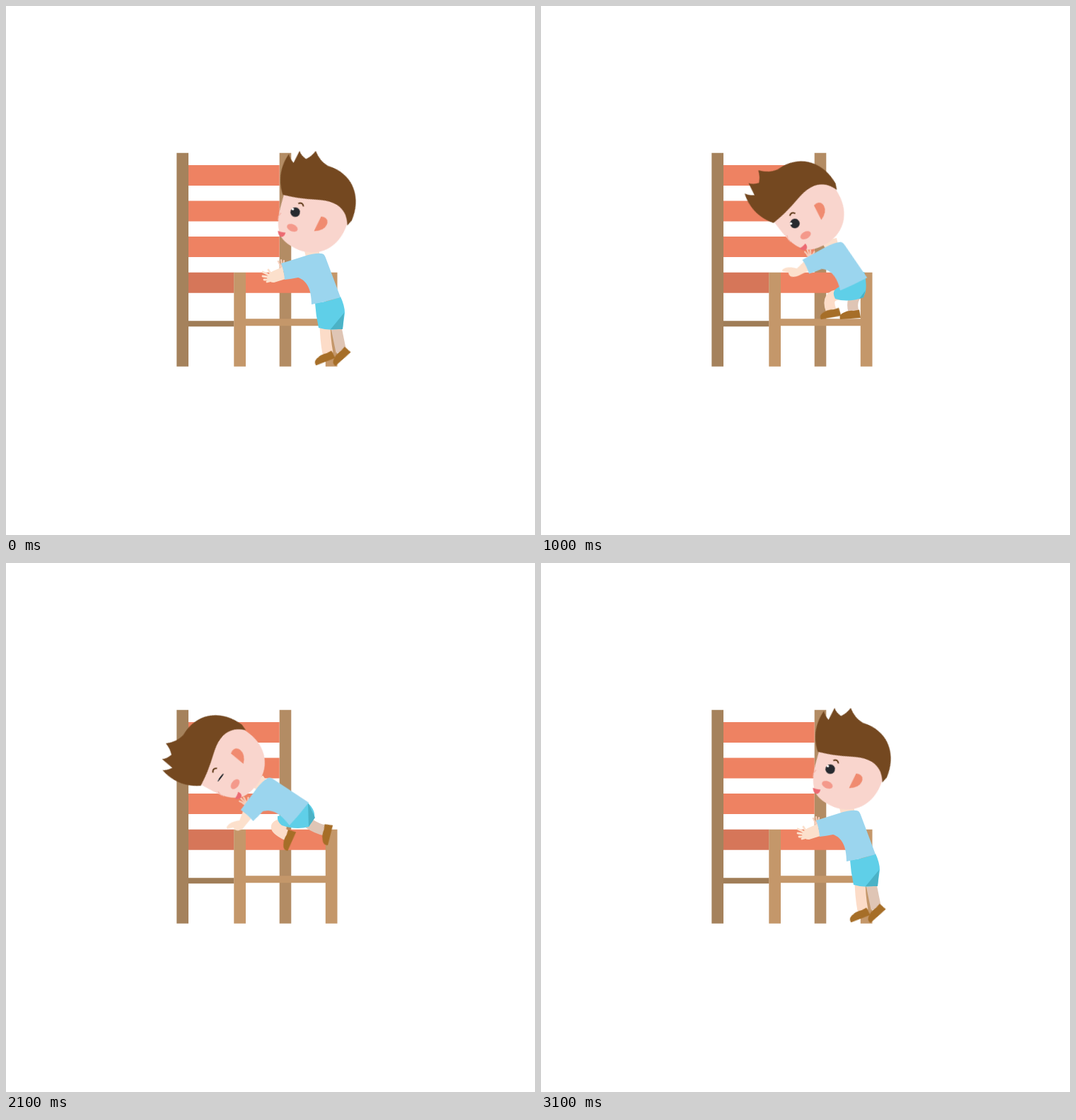
An HTML page without scripts that plays this animation: 748x748 px, repeating every 3600 ms.

```html
<!DOCTYPE html>
<html lang="en">
<head>
<meta charset="utf-8">
<title>Boy climbing a chair</title>
<style>
html, body { margin: 0; width: 100%; height: 100%; overflow: hidden; background: #fff; }
svg { display: block; width: 100vw; height: 100vh; }

/* The climb plays forward and back; one pose per 100 ms.
   The small negative delay keeps pose changes clear of exact boundaries. */
.move { animation: 1800ms step-end -5ms infinite alternate both; }
.head { animation-name: head; }
.eye { animation-name: blink; }
.torso { animation-name: torso; }
.far-hand { animation-name: far-hand; }
.open-hand { animation-name: open-hand; }
.flat-hand { animation-name: flat-hand; }
.shorts { animation-name: shorts; }
.shade { animation-name: shade; }
.near-leg { animation-name: near-leg; }
.far-leg { animation-name: far-leg; }
.near-shoe { animation-name: near-shoe; }
.far-shoe { animation-name: far-shoe; }
.leg { fill: none; stroke-width: 15; stroke-linejoin: round; }

@keyframes head {
  0% { transform: translate(409px, 291.5px) rotate(23.5deg); }
  27.78% { transform: translate(396px, 302px) rotate(0deg); animation-timing-function: steps(3); }
  44.44% { transform: translate(374px, 291px) rotate(-17deg); animation-timing-function: steps(2); }
  55.56% { transform: translate(359px, 307.5px) rotate(-29.5deg); animation-timing-function: steps(3); }
  72.22% { transform: translate(321.5px, 305.5px) rotate(-42deg); }
  77.78% { transform: translate(303.5px, 303.5px) rotate(-53deg); }
  83.33%, to { transform: translate(298px, 302.5px) rotate(-56deg); }
}
@keyframes blink {
  0%, 33.33% { transform: none; }
  27.78% { transform: scaleY(.62); }
  77.78% { transform: scaleY(.17); }
  83.33%, to { transform: none; }
}
@keyframes torso {
  0% { transform: translate(435px, 352px) rotate(0deg); }
  27.78% { transform: translate(435px, 352px) rotate(-4deg); animation-timing-function: steps(3); }
  44.44% { transform: translate(421px, 332px) rotate(-8deg); animation-timing-function: steps(2); }
  55.56% { transform: translate(412px, 338px) rotate(-12.5deg) scale(1, .93); animation-timing-function: steps(3); }
  72.22% { transform: translate(382px, 322px) rotate(-24deg) scale(1, .96); }
  77.78% { transform: translate(362px, 312.5px) rotate(-36deg); }
  83.33%, to { transform: translate(358px, 310.5px) rotate(-38deg); }
}
@keyframes far-hand {
  0% { transform: translate(-46px, 15px); }
  27.78% { transform: translate(-46px, 15px); animation-timing-function: steps(5); }
  55.56%, to { transform: translate(-36px, 7px); }
}
@keyframes open-hand { 0% { opacity: 1; } 44.44%, to { opacity: 0; } }
@keyframes flat-hand { 0% { opacity: 0; } 44.44%, to { opacity: 1; } }
@keyframes shorts {
  0% { d: path("M437,420 Q457,418 473,411 Q479,424 479,434 L476,456 Q458,460 442,455 Q438,437 437,420Z"); }
  27.78% { d: path("M440,421 Q462,417 479,407 Q486,420 485,430 L485,452 Q456,451 438,434 Q443,428 440,421Z"); animation-timing-function: steps(3); }
  44.44% { d: path("M426,402 Q448,397 467,386 Q471,397 469,408 L466,418 Q446,426 424,421 Q422,410 426,402Z"); animation-timing-function: steps(2); }
  55.56% { d: path("M420,398 Q440,385 457,376 Q461,390 459,404 L456,412 Q434,420 416,414 Q410,403 420,398Z"); animation-timing-function: steps(3); }
  72.22% { d: path("M391,371 Q410,372 435,355 Q448,362 440,381 L432,390 Q415,397 398,388 Q390,380 391,371Z"); }
  77.78%, to { d: path("M384,358 Q400,355 424,337 Q438,348 436,360 L428,373 Q410,378 390,371 Q383,366 384,358Z"); }
}
@keyframes shade {
  0% { d: path("M478,434 L476,457 L459,457Z"); }
  27.78% { d: path("M485,426 L485,453 L464,448Z"); animation-timing-function: steps(3); }
  44.44% { d: path("M469,408 L466,418 L457,421Z"); animation-timing-function: steps(2); }
  55.56% { d: path("M459,402 L456,412 L450,414Z"); animation-timing-function: steps(3); }
  72.22% { d: path("M433,354 L448,364 L440,377Z"); }
  77.78%, to { d: path("M427,339 L437,360 L428,373Z"); }
}
@keyframes near-leg {
  0% { d: path("M451,445 Q451,470 455,491"); }
  27.78% { d: path("M456,438 Q434,451 457,466"); animation-timing-function: steps(3); }
  44.44% { d: path("M434,412 Q414,418 420,431"); animation-timing-function: steps(2); }
  55.56% { d: path("M424,408 Q402,408 410,430"); animation-timing-function: steps(3); }
  72.22% { d: path("M402,382 Q376,376 384,400"); }
  77.78%, to { d: path("M396,368 Q368,371 397,385"); }
}
@keyframes far-leg {
  0% { d: path("M466,450 Q470,470 474,489"); }
  27.78% { d: path("M476,446 Q480,468 484,485"); animation-timing-function: steps(3); }
  44.44% { d: path("M454,416 Q456,432 461,452"); animation-timing-function: steps(2); }
  55.56% { d: path("M446,408 Q438,418 442,432"); animation-timing-function: steps(3); }
  72.22% { d: path("M436,370 Q444,375 452,381"); }
  77.78%, to { d: path("M428,368 Q440,376 451,378"); }
}
@keyframes near-shoe {
  0% { transform: translate(451px, 498px) rotate(-17deg); }
  27.78% { transform: translate(456px, 474px) rotate(-44deg); animation-timing-function: steps(3); }
  44.44% { transform: translate(418px, 436px) rotate(-6deg); animation-timing-function: steps(2); }
  55.56% { transform: translate(410px, 435.5px) rotate(-6deg); animation-timing-function: steps(3); }
  72.22% { transform: translate(381px, 404px) rotate(-8deg); }
  77.78%, to { transform: translate(400px, 391px) rotate(-62deg); }
}
@keyframes far-shoe {
  0% { transform: translate(474px, 495px) rotate(-38deg); }
  27.78% { transform: translate(487px, 491px) rotate(-46deg); animation-timing-function: steps(3); }
  44.44% { transform: translate(460px, 459px) rotate(-28deg); animation-timing-function: steps(2); }
  55.56% { transform: translate(438px, 437px) rotate(0deg); animation-timing-function: steps(3); }
  72.22% { transform: translate(458px, 380px) rotate(-48deg); }
  77.78%, to { transform: translate(454px, 383px) rotate(-72deg); }
}
</style>
</head>
<body>
<svg viewBox="0 0 748 748">
  <defs>
    <path id="shoe" d="M-15,6 Q-17,0 -11,-3 Q-4,-7 4,-6 L12,-7.500 L14,4 Q0,5 -15,6Z" fill="#a66e28"/>
  </defs>

  <g>
    <path d="M386.700,207.700h16.600v302h-16.600z" fill="#b38c64"/>
    <path d="M258,225h128.700v29h-128.700z M258,275.500h128.700v29h-128.700z M258,326h128.700v29h-128.700z M339,376.700h113v29h-113z" fill="#ee8262"/>
    <path d="M258,376.700h64.500v29h-64.500z" fill="#d67659"/>
    <path d="M258,445.200h64.500v8h-64.500z" fill="#a07d57"/>
    <path d="M241.300,207.700h16.700v302h-16.700z" fill="#a5825c"/>
    <path d="M339,442.200h113v10h-113z M322.300,376.700h16.700v133h-16.700z M451.800,376.700h16.700v133h-16.700z" fill="#c4976a"/>
  </g>

  <path class="move leg far-leg" stroke="#dfc5b5"/>
  <g class="move far-shoe"><use href="#shoe"/></g>
  <path class="move leg near-leg" stroke="#fcdcc8"/>
  <g class="move near-shoe"><use href="#shoe"/></g>
  <path class="move shorts" fill="#5fcfe8"/>
  <path class="move shade" fill="#4bb2c6"/>

  <g class="move torso">
    <path d="M-14,-9 H8 V2 L-10,6Z" fill="#fcdfcd"/>
  </g>

  <g class="move head">
    <path d="M-25,-19 C-22,0 -21,20 -10,34 Q-2,47 26,47 C57,45 77,22 74,-14 L68,-34 L40,-46Z" fill="#f9d5cd"/>
    <path d="M-26,-15.500 C-38,-29 -46,-48 -41,-72 Q-38,-67 -30,-63 L-29,-82 Q-25,-77 -16,-75 Q-10,-82 -8,-91 Q3,-80 16,-78.500 C52,-83 78,-58 78,-21 L75,-12 C65,-34 47,-38 20,-28 Q-4,-19 -26,-15.500Z" fill="#744820"/>
    <path d="M36,-9 Q47,-12 48,-2 Q48,8 35,14Z" fill="#f08b70"/>
    <ellipse cx="5" cy="22" rx="8" ry="5" fill="#f4998b"/>
    <path d="M-12,34 Q-6,34 -1,32 Q0,38 -4,40 Q-9,40 -12,34Z" fill="#ec6a72"/>
    <path d="M-18,9 Q-21,15 -18,20" fill="none" stroke="#f2aa9c"/>
    <path d="M-1,-13 Q4,-17.500 7.500,-12" fill="none" stroke="#5c3716" stroke-width="1.800"/>
    <g class="move eye">
      <circle r="6.800" fill="#272a2f"/>
      <circle cx="-4.800" cy="-2.600" r="1.600" fill="#fff"/>
    </g>
  </g>

  <g class="move torso" fill="#fce0cc" stroke-linecap="round">
    <g class="move far-hand">
      <path d="M-1,0 l-3,-6 M1,0 l-1,-8 M3,0 l1,-7 M5,2 l4,-5" stroke="#f6cdb9" stroke-width="2.200"/>
      <path d="M-3,-1 L6,0 L7,8 L0,8Z" fill="#f6cdb9"/>
    </g>
    <g class="move open-hand">
      <path d="M-44,17 L-58,23 Q-66,28 -66,33 Q-63,39 -56,39 L-40,34Z"/>
      <path d="M-61,26 l-3,-5 M-64,28 l-8,-4 M-65,31 l-7,-1 M-64,35 l-6,0 M-62,37 l-4,1" stroke="#fce0cc" stroke-width="2.800"/>
    </g>
    <path class="move flat-hand" d="M-44,15 L-56,23 Q-65,18 -71,18.500 Q-78,19 -77,22.500 L-69,26 Q-70,31 -66,33.500 Q-60,36 -55,34 L-40,30Z"/>
    <path d="M-46,12 Q-30,7 -14,2 Q2,-3 11,-2 Q15,-2 17,4 L38,60 Q18,66 -3,70 C-3,48 -10,36 -22,32 Q-32,34 -41,35 Q-42,22 -46,12Z" fill="#9bd5ee"/>
  </g>
</svg>
</body>
</html>
```
